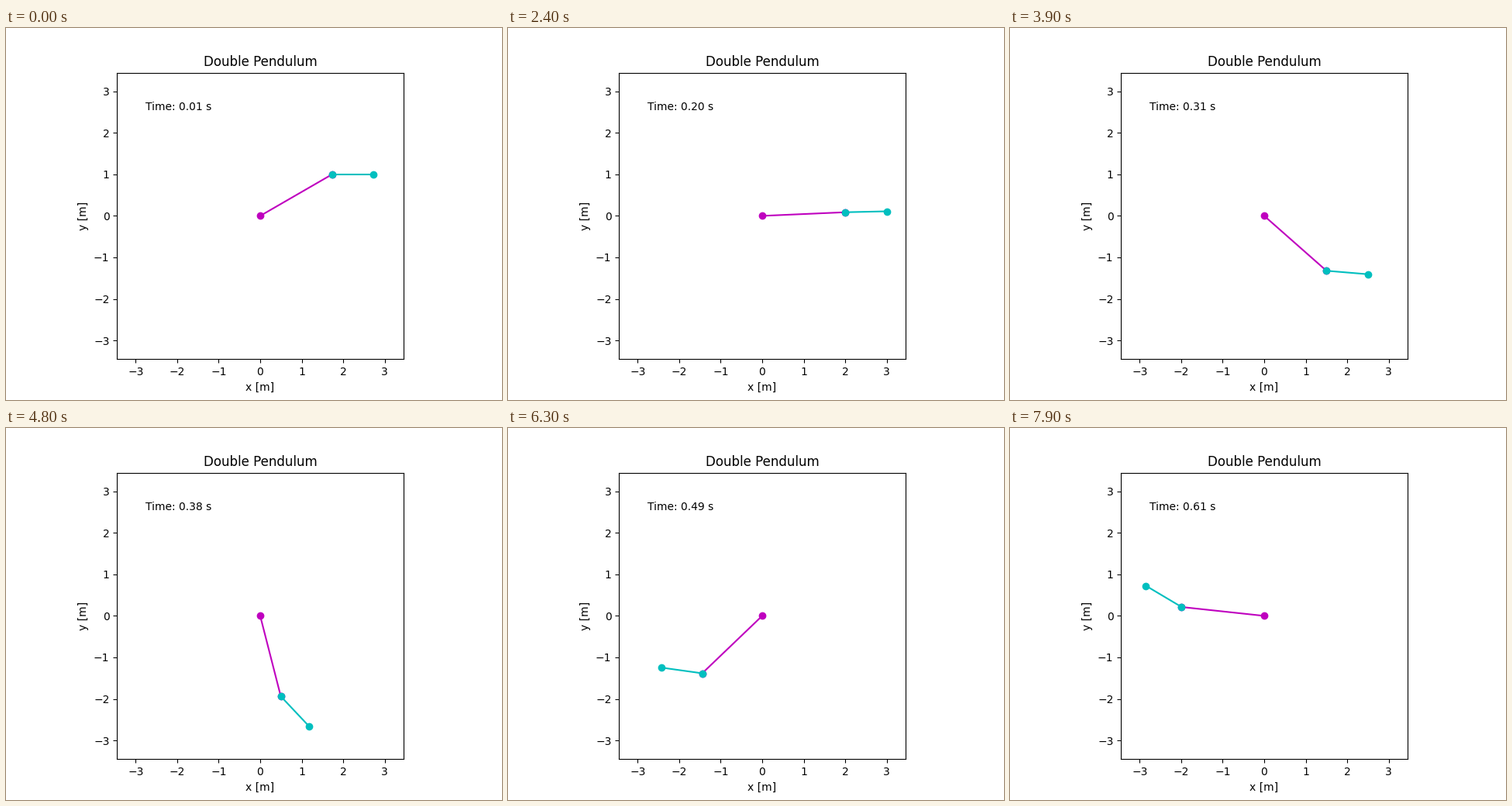
A matplotlib script for the animation above (8000 ms loop, 640x480 px).

```python
from math import cos, erf, exp, radians, sin

import matplotlib.pyplot as plt
from matplotlib.animation import FuncAnimation

FRAMES, INTERVAL = 80, 100
L1, L2 = 2.0, 1.0
LIM = 1.15 * (L1 + L2)


def inner_angle(i):
    """Degrees above +x: a swing from rest plus two weaker harmonics."""
    w = radians(1.93 * (i + 1))
    return -75.83 + 115.7 * cos(w) - 9.58 * cos(2 * w) - 0.25 * cos(3 * w)


def outer_angle(i):
    """Degrees above +x: stays level with a slight lift, then whips round."""
    lift = 1.9 * exp(-((i - 29) / 8) ** 2)
    whip = (1 + erf((i - 53.75) / 10.6)) / 2
    return lift - 210.8 * whip


def step(x, y, length, angle):
    a = radians(angle)
    return x + length * cos(a), y + length * sin(a)


fig, ax = plt.subplots(figsize=(6.4, 4.8), dpi=100)
ax.set_aspect("equal")
ax.set_xlim(-LIM, LIM)
ax.set_ylim(-LIM, LIM)
ax.set_xlabel("x [m]")
ax.set_ylabel("y [m]")
ax.set_title("Double Pendulum")

inner, = ax.plot([], [], "mo-")
outer, = ax.plot([], [], "co-")
clock = ax.text(0.1, 0.87, "", transform=ax.transAxes)


def update(i):
    x1, y1 = step(0, 0, L1, inner_angle(i))
    x2, y2 = step(x1, y1, L2, outer_angle(i))
    inner.set_data([0, x1], [0, y1])
    outer.set_data([x1, x2], [y1, y2])
    clock.set_text(f"Time: {0.0146 + 0.00753 * i:.2f} s")
    return inner, outer, clock


anim = FuncAnimation(fig, update, frames=FRAMES, interval=INTERVAL,
                     repeat=True, repeat_delay=0)
plt.show()
```
